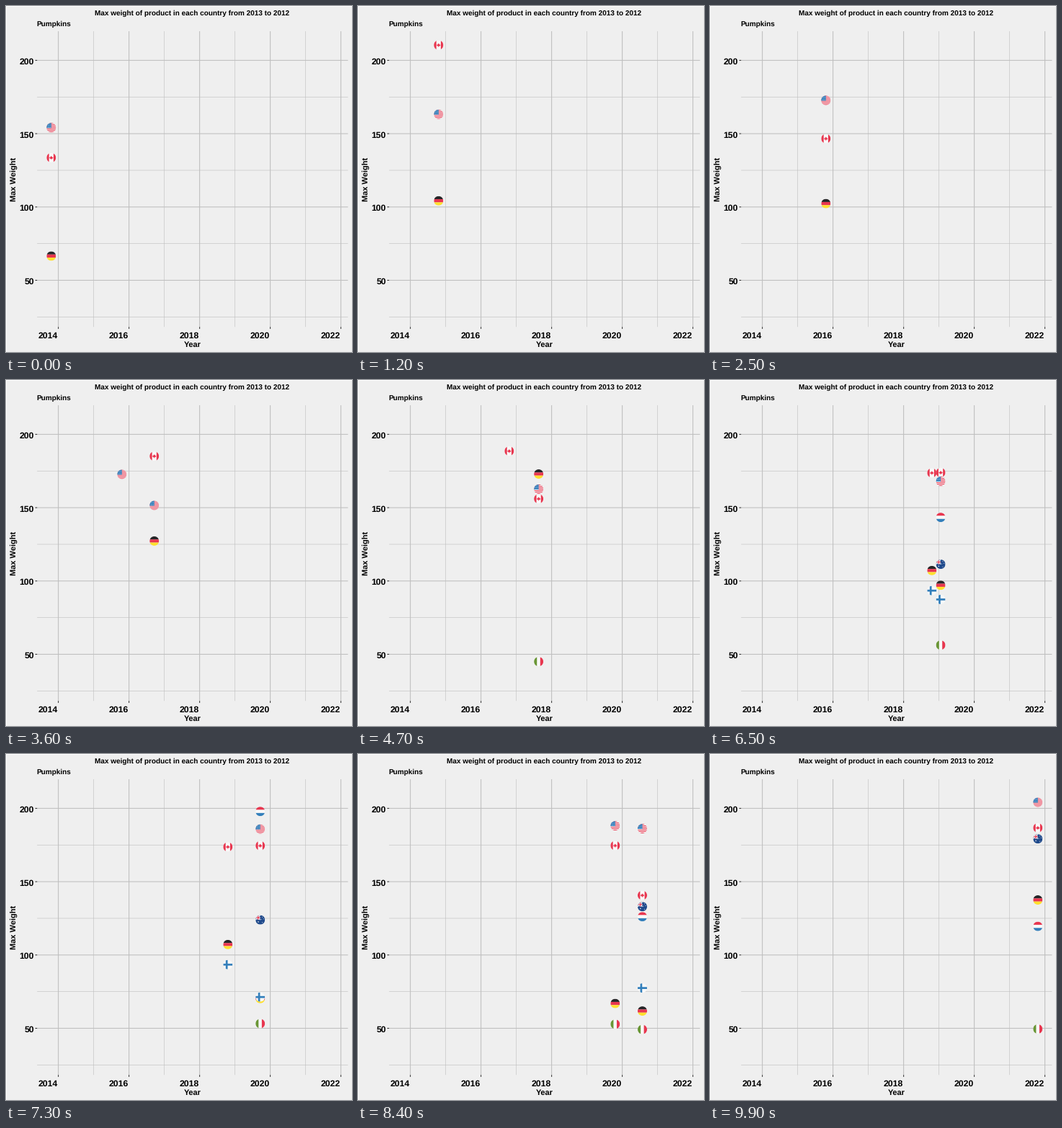
These frames come from a looping animation (480 by 480 pixels, 10000 ms). A matplotlib script:

```python
import matplotlib.pyplot as plt
import numpy as np
from matplotlib.animation import FuncAnimation
from matplotlib.patches import PathPatch, Rectangle
from matplotlib.path import Path
from matplotlib.transforms import Affine2D

SIZE, DPI, FRAMES = 480, 100, 100
PT = 72 / DPI
LEFT, RIGHT, TOP, BOTTOM = 43.2, 474.4, 35, 445.2
RADIUS = 6.5
FLAG_DROP = 1.0  # flags sit slightly below their exact value

RED, BLUE, NAVY, WHITE = "#e8364f", "#337fbb", "#1f4a8c", "#f9f9f9"
BLACK, YELLOW, GREEN = "#252527", "#ffe02e", "#699635"
GRID = "#bfbfbf"

plt.rcParams.update({
    "font.family": "Liberation Sans",
    "font.weight": "bold",
    "text.hinting": "none",
    "text.kerning_factor": 12,  # large enough to switch kerning off
})

# Frames at which each yearly state is reached
KEYS = [0, 12, 25, 37, 49, 62, 74, 87, 99]
NA = None

# Yearly maximum per country, and the years in which a tied entry lingers
WEIGHTS = {
    "au": [NA, NA, NA, NA, 99.3, 107.2, 126.0, 135.7, 179.7],
    "ca": [134.1, 210.9, 147.1, 189.1, 150.0, 174.2, 175.1, 131.0, 187.2],
    "de": [67.0, 104.7, 102.8, 130.0, 182.1, 107.6, 67.4, 60.7, 138.0],
    "fi": [NA, NA, NA, NA, 99.5, 93.9, 69.8, 80.4, NA],
    "it": [NA, NA, NA, 28.0, 49.0, 57.9, 53.3, 48.6, 50.0],
    "nl": [NA, NA, NA, NA, 180.8, 123.4, 205.2, 103.0, 120.0],
    "us": [154.6, 163.7, 173.2, 150.1, 165.7, 161.8, 188.6, 186.1, 204.6],
}
TIES = {"ca": {1, 3, 4, 5, 6}, "de": {4, 5, 6}, "fi": {5},
        "it": {4, 6}, "nl": {4}, "us": {0, 2, 6}}


def px(year):
    return 72.6 + 49 * (year - 2014)


def py(weight):
    return 75.4 + 2.034 * (200 - weight)


# Flag parts live in a unit circle with y pointing down
def poly(points):
    return Path(list(points) + [points[0]], closed=True)


def boxes(*corners):
    return Path.make_compound_path(*[
        poly([(a, b), (c, b), (c, d), (a, d)]) for a, b, c, d in corners])


def dots(points, r):
    turn = np.linspace(0, 2 * np.pi, 10, endpoint=False)
    ring = np.column_stack([np.cos(turn), np.sin(turn)]) * r
    return Path.make_compound_path(*[poly(list(ring + p)) for p in points])


def bar(x0, y0, x1, y1, width):
    d = np.array([x1 - x0, y1 - y0])
    n = np.array([-d[1], d[0]]) / np.hypot(*d) * width / 2
    a, b = np.array([x0, y0]), np.array([x1, y1])
    return poly([tuple(a + n), tuple(b + n), tuple(b - n), tuple(a - n)])


def bands(top, middle, bottom, upright=False):
    parts = []
    for colour, lo, hi in zip((top, middle, bottom), (-1, -1/3, 1/3), (-1/3, 1/3, 1)):
        box = (lo, -1, hi, 1) if upright else (-1, lo, 1, hi)
        parts.append((boxes(box), colour))
    return parts


FULL = boxes((-1, -1, 1, 1))
half_leaf = [(0, -.4), (.1, -.22), (.22, -.26), (.19, -.04), (.38, -.11),
             (.4, .05), (.19, .23), (.06, .23), (.06, .4)]
leaf = poly(half_leaf + [(-x, y) for x, y in half_leaf[::-1]])
stripes = boxes(*[(-1, -1 + 2 * i / 13, 1, -1 + 2 * (i + 1) / 13)
                  for i in range(0, 13, 2)])
stars = dots([(x, y) for x in (-.72, -.45, -.18)
              for y in (-.75, -.5, -.25, 0)], .05)

FLAGS = {
    "au": [(FULL, NAVY),
           (bar(-1, -1, 0, 0, .2), WHITE), (bar(-1, 0, 0, -1, .2), WHITE),
           (boxes((-1, -.62, 0, -.3), (-.6, -1, -.28, 0)), WHITE),
           (boxes((-1, -.54, 0, -.38), (-.52, -1, -.36, 0)), RED),
           (dots([(-.42, .42)], .12), WHITE),
           (dots([(.45, -.6), (.2, -.08), (.7, -.2), (.45, .55)], .08), WHITE)],
    "ca": [(FULL, WHITE), (boxes((-1, -1, -.48, 1), (.48, -1, 1, 1)), RED),
           (leaf, RED)],
    "de": bands(BLACK, RED, YELLOW),
    "fi": [(FULL, WHITE), (boxes((-1, -.21, 1, .21)), BLUE),
           (boxes((-.46, -1, -.04, 1)), BLUE)],
    "it": bands(GREEN, WHITE, RED, upright=True),
    "nl": bands(RED, WHITE, BLUE),
    "us": [(FULL, WHITE), (stripes, RED), (boxes((-1, -1, 0, .08)), BLUE),
           (stars, WHITE)],
}

fig = plt.figure(figsize=(SIZE / DPI, SIZE / DPI), dpi=DPI, facecolor="#efefef")
ax = fig.add_axes([0, 0, 1, 1])
ax.set(xlim=(0, SIZE), ylim=(SIZE, 0))
ax.axis("off")


class Flag:
    def __init__(self, code, z):
        self.place = Affine2D()
        trans = self.place + ax.transData
        self.parts = []
        for shape, colour in FLAGS[code]:
            part = PathPatch(shape, fc=colour, lw=0, ec="none", zorder=z,
                             transform=trans, snap=False)
            ax.add_patch(part)
            part.set_clip_path(Path.unit_circle(), trans)
            self.parts.append(part)

    def show(self, pos):
        for part in self.parts:
            part.set_visible(pos is not None)
        if pos is not None:
            x, y = pos
            self.place.clear().scale(RADIUS).translate(x, y + FLAG_DROP)


def line(xs, ys, width, colour=GRID):
    ax.plot(xs, ys, color=colour, lw=width * PT, snap=False,
            solid_capstyle="butt", zorder=1)


def label(x, y, text, size, ha="center", **kw):
    ax.text(x, y, text, fontsize=size * PT, ha=ha, va="baseline", **kw)


def draw_chart():
    ax.add_patch(Rectangle((0, 0), SIZE, SIZE, fc="none", ec="white", lw=1.1 * PT))
    for year in range(2015, 2022, 2):
        line([px(year)] * 2, [TOP, BOTTOM], .6)
    for weight in range(25, 200, 50):
        line([LEFT, RIGHT], [py(weight)] * 2, .6)
    for weight in range(50, 201, 50):
        y = py(weight)
        line([LEFT, RIGHT], [y, y], 1.07)
        line([LEFT - 2.7, LEFT], [y, y], 1.07, "#333333")
        label(39, y + 5.5, str(weight), 12.2, "right")
    for year in range(2014, 2023, 2):
        x = px(year)
        line([x, x], [TOP, BOTTOM], 1.07)
        line([x, x], [BOTTOM, BOTTOM + 2.7], 1.07, "#333333")
        label(x - .4, 461, str(year), 12.2, "right")
    mid = (LEFT + RIGHT) / 2
    label(mid - .5, 13.2, "Max weight of product in each country from 2013 to 2012", 10)
    label(LEFT - .4, 28, "Pumpkins", 10, "left")
    label(mid, 473, "Year", 11)
    label(14.2, (TOP + BOTTOM) / 2, "Max Weight", 11,
          rotation=90, rotation_mode="anchor")


draw_chart()
movers, lingerers = {}, {}
for z, code in enumerate(WEIGHTS, start=3):
    lingerers[code] = Flag(code, z)
    movers[code] = Flag(code, z)


def update(frame):
    i = min(int(np.searchsorted(KEYS, frame, side="right")) - 1, len(KEYS) - 2)
    t = (frame - KEYS[i]) / (KEYS[i + 1] - KEYS[i])
    x = 2013.8 + i
    for code, weights in WEIGHTS.items():
        a, b = weights[i], weights[i + 1]
        moving = staying = None
        if b is not None and (a is not None or t == 1):
            start = b if a is None else a
            moving = px(x + t), py(start + (b - start) * t)
        if a is not None and t < 1 and (b is None or i in TIES.get(code, ())):
            staying = px(x), py(a)
        movers[code].show(moving)
        lingerers[code].show(staying)
    return []


anim = FuncAnimation(fig, update, frames=FRAMES, interval=100,
                     repeat=True, repeat_delay=0, blit=False)
plt.show()
```
